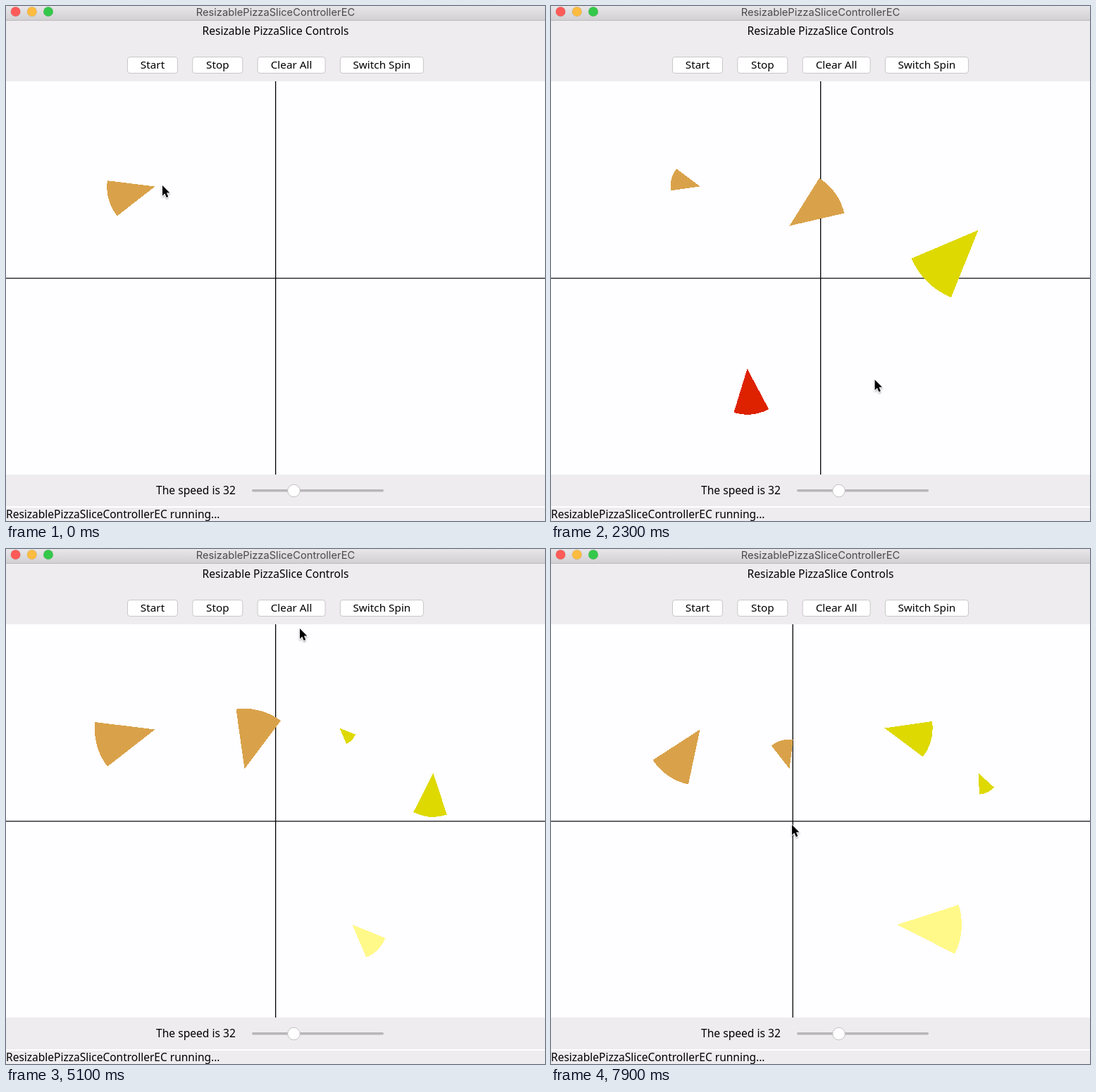
These frames come from a looping animation (765x732 px, 8 s). An HTML page:

```html
<!DOCTYPE html>
<html lang="en">
<head>
<meta charset="utf-8">
<title>Pizza slices</title>
<style>
  html, body { margin: 0; width: 100%; height: 100%; overflow: hidden; background: #fefdff; }
  svg { display: block; width: 765px; height: 732px; }
  text { font: 15.6px "Noto Sans", "Open Sans", sans-serif; fill: #000; }
  .title { font: 14.7px Inter, Roboto, sans-serif; fill: #4b494b; }
  .status { font-size: 15.5px; }
  .mid { text-anchor: middle; }
  .button rect { fill: #fff; stroke: #c9c7c9; }
  .button text { font-size: 15.3px; }
</style>
</head>
<body>
<svg viewBox="0 0 765 732">
  <defs>
    <linearGradient id="bar" x2="0" y2="1">
      <stop stop-color="#e8e6e8"/><stop offset="1" stop-color="#d2d0d2"/>
    </linearGradient>
    <filter id="soft" x="-50%" y="-50%" width="200%" height="200%">
      <feDropShadow dx="0" dy="1.5" stdDeviation="1.2" flood-opacity=".35"/>
    </filter>
  </defs>
  <rect width="765" height="732" fill="#fefdff"/>
  <rect width="765" height="107" fill="#eeecee"/>
  <rect width="765" height="20" fill="url(#bar)"/>
  <rect y="20" width="765" height="1" fill="#bcbabc"/>
  <g id="lights" stroke="#000" stroke-opacity=".12" stroke-width=".7"></g>
  <text class="title mid" x="382.5" y="14">ResizablePizzaSliceControllerEC</text>
  <text class="mid" x="382.5" y="41">Resizable PizzaSlice Controls</text>
  <g id="buttons"></g>

  <rect y="386.4" width="765" height="1.2"/>
  <rect id="divider" y="107" width="1.3" height="559"/>
  <g id="slices" shape-rendering="crispEdges"></g>

  <rect y="666" width="765" height="66" fill="#eeecee"/>
  <rect y="711" width="765" height="2" fill="#fff"/>
  <text x="213" y="694">The speed is 32</text>
  <rect x="349" y="687" width="187" height="3.5" rx="1.7" fill="#b8b6b8"/>
  <circle cx="408.5" cy="689" r="8.8" fill="#fff" stroke="#c2c0c2"/>
  <text class="status" x="0" y="728">ResizablePizzaSliceControllerEC running...</text>

  <path id="cursor" d="M0 0V14.8L3.4 11.6 5.8 17.2 8.3 16.1 5.9 10.6H10.4Z"
        stroke="#fff" stroke-width="1.5" paint-order="stroke" filter="url(#soft)"/>
</svg>
<script>
const LOOP = 8000, FRAME = 100, TICK = 70.5;
const MIN_RADIUS = 24.3, GROWTH = 2.92, HALF_CYCLE = 27, FIRST_STEP = 8;
const HORIZON = 387, DIVIDER = 382;
const GRAB_SLICE = 3600, DROP_SLICE = 4800, GRAB_DIVIDER = 6350, DIVIDER_LAG = 50;
const QUADRANT_COLORS = ['#ded900', '#d9a24a', '#de2200', '#fff98a'];
const $ = id => document.getElementById(id);

function make(parent, tag, attrs, text = '') {
  const node = document.createElementNS('http://www.w3.org/2000/svg', tag);
  for (const key in attrs) node.setAttribute(key, attrs[key]);
  node.textContent = text;
  return parent.appendChild(node);
}

['#fc5b57', '#fdbc40', '#34c84a'].forEach((fill, i) =>
  make($('lights'), 'circle', { cx: 13.6 + 23.2 * i, cy: 8, r: 6.8, fill }));

let left = 172;
for (const [label, width] of
  [['Start', 72], ['Stop', 72], ['Clear All', 97], ['Switch Spin', 119]]) {
  const group = make($('buttons'), 'g', { class: 'button' });
  make(group, 'rect', { x: left + .5, y: 72.5, width: width - 1, height: 23, rx: 3.5 });
  make(group, 'text', { class: 'mid', x: left + width / 2, y: 88.5 }, label);
  left += width + 20.3;
}

// Birth is counted in ticks; quadrants run counterclockwise from the upper right.
const slices = [
  { birth: -7.5, x: 211.5, y: 256.5 },
  { birth: 5.2, x: 338.5, y: 312.5 },
  { birth: 13.1, x: 606.5, y: 318.5 },
  { birth: 26.2, x: 278.5, y: 515.5, dragged: true },
  { birth: 34.7, x: 491.5, y: 534 }
];
for (const slice of slices) {
  slice.node = make($('slices'), 'path', {});
  slice.home = quadrantAt(slice.x, slice.y, DIVIDER);
}

// The pointer clicks every new slice into being, then drags one slice and the divider.
const stops = [
  { at: 0, x: 222, y: 255 },
  ...slices.slice(1).map(({ birth, x, y }) => ({ at: birth * TICK, x, y })),
  { at: 1600, x: 535, y: 472 },
  { at: 2900, x: 310, y: 517 },
  { at: GRAB_SLICE, x: 251, y: 491 },
  { at: 3900, x: 333, y: 572 },
  { at: 4350, x: 465, y: 440 },
  { at: DROP_SLICE, x: 446, y: 230 },
  { at: 5100, x: 417, y: 113 },
  { at: GRAB_DIVIDER, x: 383, y: 415 },
  { at: 6850, x: 575, y: 412 },
  { at: 7900, x: 342, y: 392 }
].sort((a, b) => a.at - b.at);

function pointer(t) {
  const i = stops.findIndex(stop => stop.at > t);
  if (i < 0) return stops[stops.length - 1];
  const from = stops[i - 1], to = stops[i];
  const u = (t - from.at) / (to.at - from.at), eased = u * u * (3 - 2 * u);
  return { x: from.x + (to.x - from.x) * eased, y: from.y + (to.y - from.y) * eased };
}

function dragOffset(t, grab, drop) {
  const start = pointer(grab), now = pointer(Math.min(Math.max(t, grab), drop));
  return { x: now.x - start.x, y: now.y - start.y };
}

function quadrantAt(x, y, dividerX) {
  if (y < HORIZON) return x > dividerX ? 0 : 1;
  return x < dividerX ? 2 : 3;
}

function wedge(x, y, radius, start) {
  const rim = degrees => {
    const a = degrees * Math.PI / 180;
    return `${x + radius * Math.cos(a)} ${y - radius * Math.sin(a)}`;
  };
  return `M${x} ${y}L${rim(start)}A${radius} ${radius} 0 0 0 ${rim(start + 45)}Z`;
}

function drawSlice(slice, t, dividerX) {
  const age = Math.floor(t / TICK - slice.birth);
  slice.node.style.display = age < 0 ? 'none' : '';
  if (age < 0) return;
  const step = (FIRST_STEP + age) % (2 * HALF_CYCLE);
  const radius = MIN_RADIUS + GROWTH * Math.min(step, 2 * HALF_CYCLE - step);
  const offset = slice.dragged ? dragOffset(t, GRAB_SLICE, DROP_SLICE) : { x: 0, y: 0 };
  const x = slice.x + offset.x, y = slice.y + offset.y;
  // A slice that was moved by hand no longer reacts to the divider.
  const quadrant = quadrantAt(x, y, slice.dragged ? DIVIDER : dividerX);
  slice.node.setAttribute('d', wedge(x, y, radius, 13 + 90 * slice.home + 10 * age));
  slice.node.setAttribute('fill', QUADRANT_COLORS[quadrant]);
}

function render(time) {
  const t = Math.floor(time % LOOP / FRAME) * FRAME;
  const dividerX = DIVIDER + dragOffset(t - DIVIDER_LAG, GRAB_DIVIDER, LOOP).x;
  $('divider').setAttribute('x', dividerX);
  for (const slice of slices) drawSlice(slice, t, dividerX);
  const { x, y } = pointer(t);
  $('cursor').setAttribute('transform', `translate(${x} ${y})`);
}

let origin;
function loop(now) {
  origin ??= now;
  render(now - origin);
  requestAnimationFrame(loop);
}
render(0);
requestAnimationFrame(loop);
</script>
</body>
</html>
```
